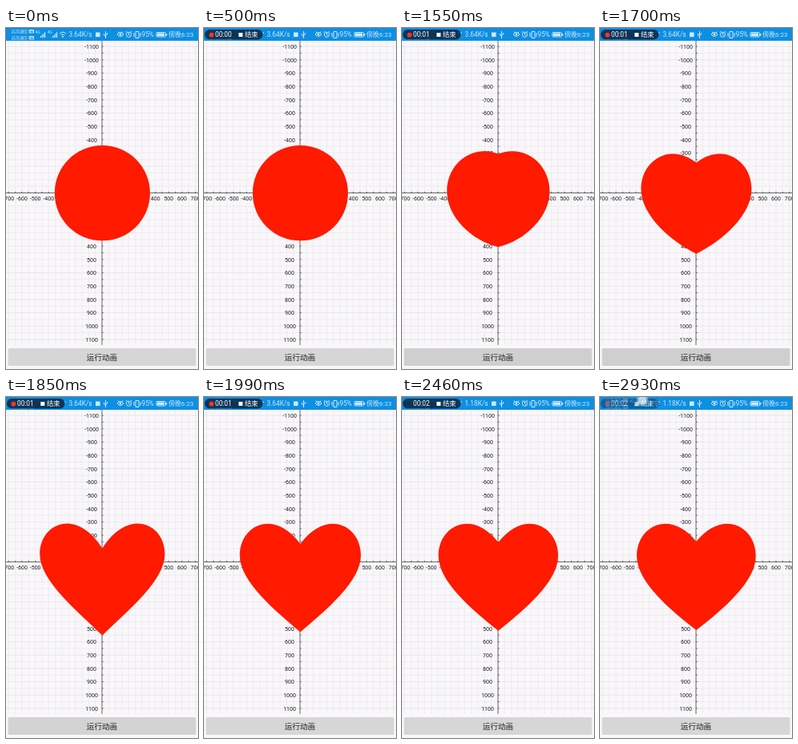
Animation, 240 px wide and 427 px high, one loop 2990 ms. Source, as an HTML page:

```html
<!DOCTYPE html>
<html lang="zh-CN">
<head>
<meta charset="utf-8">
<title>Heart morph</title>
<style>
html, body { margin: 0; width: 100%; height: 100%; overflow: hidden; background: #f9f7fa; }
svg { display: block; width: 100vw; height: 100vh; }
text { font-family: Roboto, "Noto Sans CJK SC", "Noto Sans CJK", sans-serif; }
#labels { font-size: 7px; fill: #222; text-anchor: middle; }
#bar { fill: #cfe7fa; font-size: 8.3px; }
#bar .line { fill: none; stroke: #cfe7fa; stroke-width: 1; }
#pill { fill: #fff; font-size: 8.3px; }
</style>
</head>
<body>
<svg viewBox="0 0 240 427" preserveAspectRatio="none">
  <rect width="240" height="427" fill="#f9f7fa"/>
  <path id="grid" stroke="#e9e7ea" stroke-width=".7"/>
  <path id="axes" stroke="#444" stroke-width=".8"/>
  <g id="labels"></g>
  <path id="shape" fill="#ff1a00"/>

  <rect id="button" x="2.5" y="401" width="235" height="22" rx="1.5"/>
  <text x="120" y="415.6" font-size="9.6" font-weight="500" text-anchor="middle" fill="#222">运行动画</text>

  <rect width="240" height="16" fill="#0d8fe2"/>
  <g id="bar">
    <g font-size="5.1">
      <text x="6.8" y="6.4">远岚通信</text>
      <text x="6.8" y="14.4">远岚通信</text>
      <rect x="28.5" y="2" width="6.5" height="4.6" rx="1"/>
      <rect x="28.5" y="10" width="6.5" height="4.6" rx="1"/>
      <g font-size="3.8" font-weight="700" fill="#0d8fe2">
        <text x="29.2" y="5.7">HD</text><text x="29.2" y="13.7">HD</text>
      </g>
      <text x="36.5" y="7">4G</text><text x="51.5" y="7">4G</text>
    </g>
    <path id="signal"/>
    <path class="line" d="M67 7q4-3.6 8 0M68.7 9q2.3-2 4.6 0"/><circle cx="71" cy="11" r="1"/>
    <text id="speed" x="78.5" y="11.3"></text>
    <rect x="112" y="5.5" width="5.6" height="5.6"/>
    <path class="line" stroke-width=".8" d="M124.5 4v9M122.5 7v2l2 1.5M126.5 6v2l-2 1.5"/>
    <path class="line" d="M139 8q4-5 8 0q-4 5-8 0M140 4.5l1 1.5M146 4.5l-1 1.5"/><circle cx="143" cy="8" r="1.4"/>
    <path class="line" d="M153.500 6v2.500l1.500 1M149.800 5.500l1.500-1.700M157.200 5.500l-1.500-1.700"/>
    <circle class="line" cx="153.500" cy="8.300" r="3.100"/>
    <path class="line" d="M162 4.500h4v8h-4zM160 6v5M168 6v5"/>
    <text x="169.500" y="11.300">95%</text>
    <rect class="line" x="188" y="5.500" width="11.500" height="5.500" rx="1"/>
    <rect x="189" y="6.500" width="9" height="3.500"/><rect x="200" y="7" width="1.300" height="2.600"/>
    <text x="203" y="11.300" font-size="8">傍晚6:23</text>
  </g>

  <g id="pill">
    <rect x="1" y="2" width="72.500" height="12.500" rx="6.200" fill="#0b2a49" fill-opacity=".9"/>
    <circle id="rec" cx="9.300" cy="8.700" r="2.900" fill="#ff3521"/>
    <text id="timer" x="14" y="11.300"></text>
    <rect x="43.300" y="6" width="5" height="5"/>
    <text x="51" y="11.400">结束</text>
  </g>

  <g id="touch">
    <circle r="7.300" fill="#fff" fill-opacity=".35" stroke="#aaa" stroke-opacity=".55" stroke-width=".7"/>
    <circle r="5.200" fill="#fff" fill-opacity=".55"/>
  </g>
</svg>
<script>
const $ = id => document.getElementById(id);
const LOOP = 2990, CX = 120.4, CY = 206.7, UNIT = 16.67;
const clamp = v => Math.max(0, Math.min(1, v));
const ramp = (t, from, to) => clamp((t - from) / (to - from));

// Chart: a line every half unit, a label every unit
let grid = '', axes = 'M0 206.500H240M120 16V397', labels = '';
for (let i = -22; i <= 22; i++) {
  const x = 120 + i * UNIT / 2, y = 206.5 + i * UNIT / 2;
  grid += `M${x} 16V397M0 ${y}H240`;
  axes += `M${x} 206.500v-1.700M120 ${y}h1.700`;
}
for (let i = -11; i <= 11; i++) {
  const y = 206.5 + i * UNIT;
  if (Math.abs(i) > 11 / 2) {
    const far = y + (i < 0 ? -1 : 1) * 0;
    grid += `M0 ${far}H240`;
  }
  if (!i) continue;
  labels += `<text x="107" y="${y + 2.7}">${i * 100}</text>`;
  if (Math.abs(i) < 8) labels += `<text x="${120 + i * UNIT}" y="216.300">${i * 100}</text>`;
}
for (let i = 23; i < 46; i++) {
  const d = i * UNIT / 2;
  if (206.5 - d > 16) grid += `M0 ${206.5 - d}H240`;
  if (206.5 + d < 397) grid += `M0 ${206.5 + d}H240`;
}
$('grid').setAttribute('d', grid);
$('axes').setAttribute('d', axes);
$('labels').innerHTML = labels;

let bars = '';
for (const x of [43, 58]) {
  for (let i = 0; i < 4; i++) bars += `M${x + i * 1.7} 12v${-2 - i * 1.6}h1.1V12z`;
}
$('signal').setAttribute('d', bars);

// Right half of the outline, top to bottom, as circle and as heart
const R = 59.6, M = 32.9;
const circle = [[0, -R], [M, -R], [R, -M], [R, 0], [R, M], [M, R], [0, R]];
const heart = [[0, -25.5], [M, -67.2], [74.5, -45], [74.5, -8], [74.5, 25], [M, R], [0, 85.5]];

function outline(p) {
  const pts = circle.map(([x, y], i) => [x + (heart[i][0] - x) * p, y + (heart[i][1] - y) * p]);
  const at = ([x, y], side) => `${(CX + side * x).toFixed(2)} ${(CY + y).toFixed(2)}`;
  const right = pts.slice(1).map(q => at(q, 1));
  const left = pts.slice(0, 6).reverse().map(q => at(q, -1));
  return `M${at(pts[0], 1)}C${right.join(' ')}C${left.join(' ')}Z`;
}

// Damped spring over two seconds
function spring(t) {
  const x = (t - 1528) / 2000;
  return x <= 0 ? 0 : 1 - 2 ** (-10 * x) * Math.cos(20 * Math.PI * x);
}

function draw(t) {
  $('shape').setAttribute('d', outline(spring(t)));

  const pressed = ramp(t, 1170, 1300) * (1 - ramp(t, 1700, 1950));
  const grey = Math.round(214 - 7 * pressed);
  $('button').setAttribute('fill', `rgb(${grey},${grey},${grey})`);

  $('pill').setAttribute('opacity', ramp(t, 15, 210) * (1 - .5 * ramp(t, 2780, 2930)));
  $('rec').setAttribute('opacity', +((t >= 500 && t < 1030) || (t >= 1530 && t < 2030) || t >= 2530));
  $('timer').textContent = '00:0' + (t < 1030 ? 0 : t < 2030 ? 1 : 2);
  $('speed').textContent = (t < 2200 ? '3.64' : '1.18') + 'K/s';

  const ending = t >= 2780;
  const shown = ending ? ramp(t, 2780, 2900) : +(t >= 1170 && t < 1530);
  $('touch').setAttribute('opacity', shown);
  $('touch').setAttribute('transform', ending ? 'translate(53 4)' : 'translate(158.500 408)');
}

const start = performance.now();
function tick() {
  draw((performance.now() - start) % LOOP);
  requestAnimationFrame(tick);
}
tick();
</script>
</body>
</html>
```
